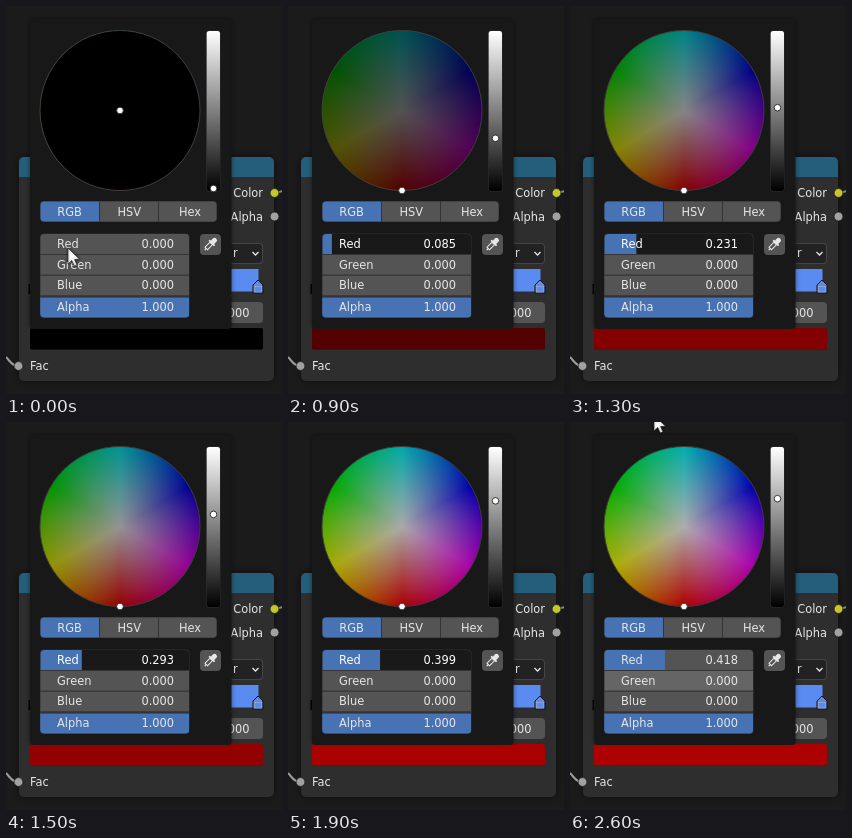
These frames come from a looping animation (276 by 388 pixels, 2700 ms). An HTML page with a canvas:

```html
<!DOCTYPE html>
<html lang="en">
<head>
<meta charset="utf-8">
<title>Colour picker</title>
<style>
html, body { margin: 0; width: 100%; height: 100%; overflow: hidden; background: #1b1b1b; }
canvas { display: block; width: 276px; height: 388px; }
</style>
</head>
<body>
<canvas id="stage" width="276" height="388"></canvas>
<script>
const ctx = document.getElementById('stage').getContext('2d');
const LOOP = 2700, STEP = 100;
const GRAY = '#545454', HOVER = '#656565', BLUE = '#4772b3', DARK = '#191919', TEXT = '#e6e6e6';
const WHEEL = { x: 114, y: 104.5, r: 80 };

// [time, value] and [time, x, y]
const valueKeys = [[700, 0], [1100, 0.169], [1500, 0.293], [1900, 0.399], [2000, 0.414], [2100, 0.418]];
const leaveKeys = [[2200, 81, 249.5], [2300, 88, 260], [2400, 90, 268], [2500, 88, 130], [2600, 84, -7]];

function track(keys, t) {
  if (t <= keys[0][0]) return keys[0].slice(1);
  for (let i = 1; i < keys.length; i++) {
    const a = keys[i - 1], b = keys[i];
    if (t <= b[0]) {
      const k = (t - a[0]) / (b[0] - a[0]);
      return a.slice(1).map((v, j) => v + (b[j + 1] - v) * k);
    }
  }
  return keys[keys.length - 1].slice(1);
}

const toSrgb = v => v <= 0.0031308 ? v * 12.92 : 1.055 * Math.pow(v, 1 / 2.4) - 0.055;

function box(x, y, w, h, fill, r = 0) {
  ctx.beginPath();
  ctx.roundRect(x, y, w, h, r);
  ctx.fillStyle = fill;
  ctx.fill();
}

function disc(x, y, r, fill, stroke, width = 1) {
  ctx.beginPath();
  ctx.arc(x, y, r, 0, Math.PI * 2);
  if (fill) { ctx.fillStyle = fill; ctx.fill(); }
  if (stroke) { ctx.strokeStyle = stroke; ctx.lineWidth = width; ctx.stroke(); }
}

function poly(points, fill, stroke, width = 1) {
  ctx.beginPath();
  points.forEach(([x, y]) => ctx.lineTo(x, y));
  ctx.closePath();
  ctx.fillStyle = fill;
  ctx.fill();
  if (stroke) { ctx.strokeStyle = stroke; ctx.lineWidth = width; ctx.stroke(); }
}

function curve(width, color, x, y, ...c) {
  ctx.beginPath();
  ctx.moveTo(x, y);
  ctx.bezierCurveTo(...c);
  ctx.strokeStyle = color;
  ctx.lineWidth = width;
  ctx.stroke();
}

function label(str, x, y, align = 'left', color = TEXT) {
  ctx.font = '11.4px "DejaVu Sans", sans-serif';
  ctx.textAlign = align;
  ctx.textBaseline = 'alphabetic';
  ctx.fillStyle = color;
  ctx.fillText(str, x, y);
}

function withShadow(blur, paint) {
  ctx.save();
  ctx.shadowColor = 'rgba(0,0,0,0.5)';
  ctx.shadowBlur = blur;
  paint();
  ctx.restore();
}

function drawNode(red) {
  box(0, 0, 276, 388, '#1b1b1b');
  withShadow(8, () => box(13, 151, 255, 224, '#2e2e2e', 5));
  box(13, 151, 255, 20, '#235f7b', [5, 5, 0, 0]);

  curve(4, '#141414', 0, 351, 4, 355, 6, 360, 12, 360);
  curve(2.2, '#9a9a9a', 0, 351, 4, 355, 6, 360, 12, 360);
  curve(2, '#8f8f62', 268, 187, 271, 187, 274, 186, 277, 185);
  disc(268.5, 187, 4.4, '#c7c729', '#1a1a1a', 0.7);
  disc(268.5, 210.5, 4.4, '#a1a1a1', '#1a1a1a', 0.7);
  disc(12.5, 360, 4.4, '#a1a1a1', '#1a1a1a', 0.7);
  label('Color', 257, 191, 'right');
  label('Alpha', 257, 214.5, 'right');
  label('Fac', 24, 364);

  box(140, 237, 117, 21, '#454545', 4);
  box(141, 238, 115, 19, '#222', 3);
  label('r', 227, 251);
  ctx.beginPath();
  ctx.moveTo(246.5, 246);
  ctx.lineTo(249.5, 249);
  ctx.lineTo(252.5, 246);
  ctx.strokeStyle = TEXT;
  ctx.lineWidth = 1.3;
  ctx.stroke();

  box(30, 263, 222.5, 22.5, '#5a8bf0');
  box(22.5, 278, 4, 10, '#000');
  poly([[252, 274], [257, 279], [257, 287], [247, 287], [247, 279]], '#5a8bf0', '#111');
  ctx.strokeStyle = '#aaa';
  ctx.lineWidth = 0.7;
  ctx.strokeRect(248.5, 280.5, 7, 5.5);

  box(140, 296, 117, 21, GRAY, 4);
  label('0.000', 243.5, 310.5, 'right');
  box(24, 322, 233, 22, '#242424', 2);
  box(24, 322, 233, 21.5, `rgb(${red},0,0)`, 2);
}

function drawWheel(v) {
  const { x, y, r } = WHEEL;
  const hues = ctx.createConicGradient(Math.PI / 2, x, y);
  for (let i = 0; i <= 6; i++) hues.addColorStop(i / 6, `hsl(${i * 60},100%,50%)`);
  const white = ctx.createRadialGradient(x, y, 0, x, y, r);
  white.addColorStop(0, 'rgba(255,255,255,1)');
  white.addColorStop(1, 'rgba(255,255,255,0)');
  disc(x, y, r, hues);
  disc(x, y, r, white);
  disc(x, y, r, `rgba(0,0,0,${1 - v})`, '#3c3c3c');
  disc(x, y + (v > 0 ? r : 0), 3.3, '#fff', '#222', 0.8);
}

function drawValueBar(v) {
  const g = ctx.createLinearGradient(0, 25, 0, 185);
  g.addColorStop(0, '#fff');
  g.addColorStop(1, '#000');
  box(200, 24.5, 14.5, 161, '#2c2c2c', 3);
  box(200.7, 25, 13.3, 160, g, 2.5);
  disc(207.5, 182.5 - 156 * v, 3.3, '#fff', '#222', 0.9);
}

function drawTabs() {
  box(34, 195, 177, 21, '#333', 4);
  box(34.5, 195.5, 58.5, 20, BLUE, [4, 0, 0, 4]);
  box(94, 195.5, 58, 20, GRAY);
  box(153, 195.5, 57.5, 20, GRAY, [0, 4, 4, 0]);
  label('RGB', 63.5, 209.5, 'center');
  label('HSV', 123.3, 209.5, 'center');
  label('Hex', 184, 209.5, 'center');
}

function drawRow(y, name, value, fill, radius) {
  ctx.save();
  ctx.beginPath();
  ctx.roundRect(34.5, y, 148.5, 20, radius);
  ctx.clip();
  box(34, y, 150, 20, fill);
  box(31, y, 153 * value, 20, BLUE);
  ctx.restore();
  const color = fill === DARK ? '#fff' : TEXT;
  label(name, 51, y + 14, 'left', color);
  label(value.toFixed(3), 168, y + 14, 'right', color);
}

function drawDropper() {
  box(194, 228, 21, 21, GRAY, 4);
  ctx.save();
  ctx.translate(204.5, 238.3);
  ctx.rotate(Math.PI / 4);
  box(-2.4, -8, 4.8, 6.5, '#e8e8e8', 2);
  box(-4, -2.8, 8, 1.8, '#e8e8e8', 0.8);
  ctx.strokeStyle = '#e8e8e8';
  ctx.lineWidth = 1;
  ctx.strokeRect(-1.8, -1, 3.6, 7);
  box(-0.6, 6, 1.2, 2.2, '#e8e8e8');
  ctx.restore();
}

function drawCursor(x, y) {
  const shape = [[0, 0], [0, 16], [3.7, 12.6], [6.4, 18], [9, 16.8], [6.6, 11.6], [11.6, 11.3]];
  withShadow(3, () => poly(shape.map(([a, b]) => [x + a, y + b]), '#fff', '#222', 0.7));
}

function draw(t) {
  const [value] = track(valueKeys, t);
  const v = toSrgb(value);
  const dragging = t >= 500 && t < 2200;
  const hover = t < 100 || dragging ? -1 : t < 2300 ? 0 : 1;
  const fill = i => i === hover ? HOVER : GRAY;

  drawNode(Math.round(255 * v));

  ctx.save();
  ctx.beginPath();
  ctx.rect(0, 0, 276, 323);
  ctx.clip();
  withShadow(5, () => box(24, 13, 201.5, 310, '#181818', 4));
  ctx.restore();

  drawWheel(v);
  drawValueBar(v);
  drawTabs();

  box(34, 227.5, 149.5, 84.5, '#333', 4);
  drawRow(228, 'Red', value, dragging ? DARK : fill(0), [4, 4, 0, 0]);
  drawRow(248.7, 'Green', 0, fill(1), 0);
  drawRow(269.4, 'Blue', 0, fill(2), 0);
  drawRow(291.4, 'Alpha', 1, BLUE, [0, 0, 4, 4]);
  drawDropper();

  if (!dragging) {
    const [x, y] = t < 500 ? [62, 242] : track(leaveKeys, t);
    drawCursor(x, y);
  }
}

const start = performance.now();
function tick() {
  const t = (performance.now() - start) % LOOP;
  draw(Math.floor(t / STEP) * STEP);
  requestAnimationFrame(tick);
}
tick();
</script>
</body>
</html>
```
